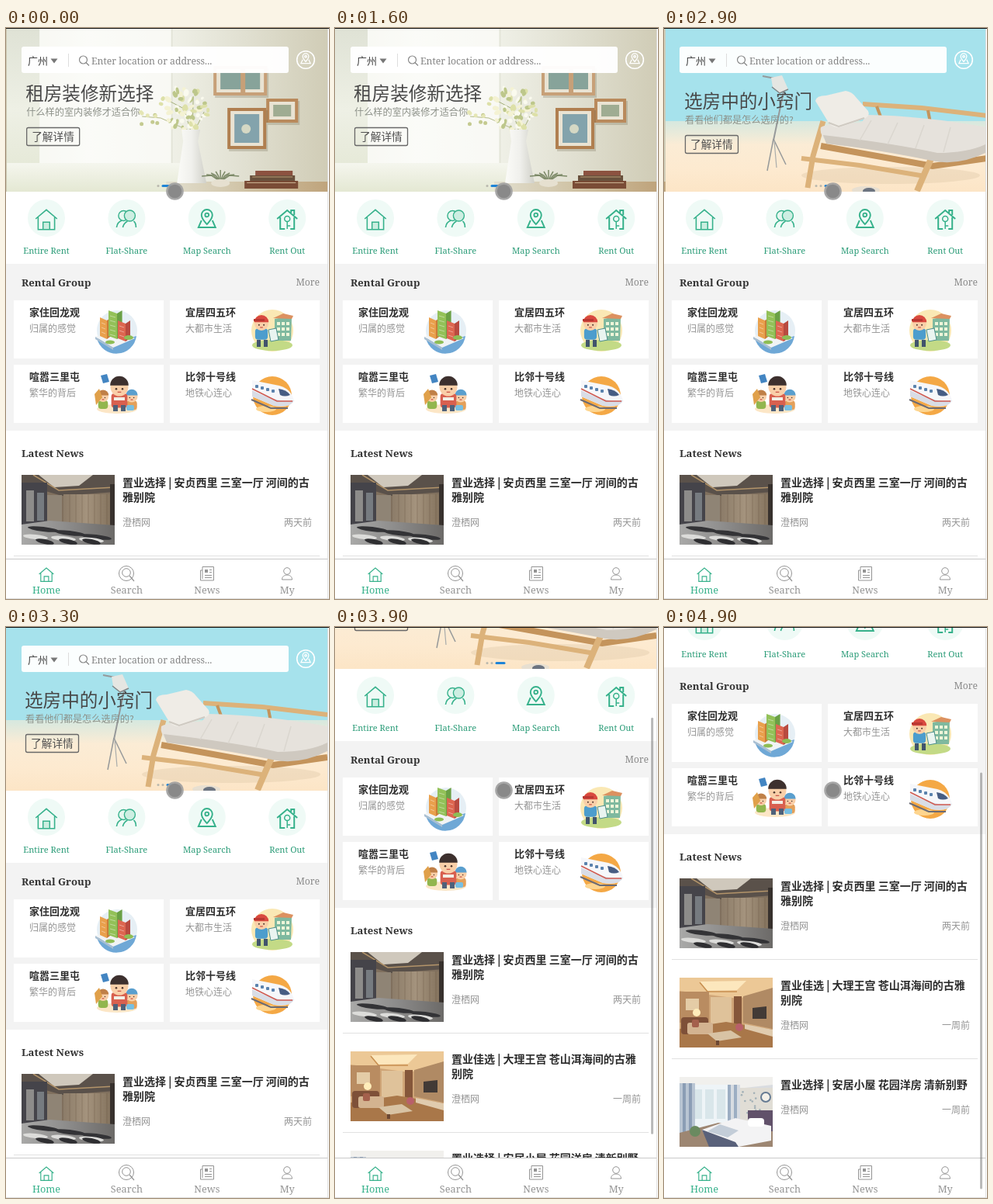
An HTML page with a canvas for the animation above (5000 ms loop, 416 by 736 pixels).

```html
<!DOCTYPE html>
<html lang="zh">
<head>
<meta charset="utf-8">
<style>
html, body { margin: 0; width: 100%; height: 100%; overflow: hidden; background: #fff; }
canvas { display: block; }
</style>
</head>
<body>
<canvas id="stage" width="416" height="736"></canvas>
<script>
const ctx = document.getElementById('stage').getContext('2d');
const SERIF = '"Noto Serif", serif';
const CJK = '"Noto Sans CJK SC", "Noto Sans CJK", sans-serif';
const LOOP = 5000, WIDTH = 414;
const GREEN = '#36b18b', GRAY = '#949494';

// drawing helpers
function paint(fill, stroke, w = 1) {
  if (fill) { ctx.fillStyle = fill; ctx.fill(); }
  if (stroke) { ctx.strokeStyle = stroke; ctx.lineWidth = w; ctx.stroke(); }
}
function rect(x, y, w, h, fill) { ctx.fillStyle = fill; ctx.fillRect(x, y, w, h); }
function round(x, y, w, h, r, fill, stroke, lw) {
  ctx.beginPath(); ctx.roundRect(x, y, w, h, r); paint(fill, stroke, lw);
}
function circle(x, y, r, fill, stroke, lw) {
  ctx.beginPath(); ctx.arc(x, y, r, 0, 7); paint(fill, stroke, lw);
}
function oval(x, y, rx, ry, fill, turn = 0) {
  ctx.beginPath(); ctx.ellipse(x, y, rx, ry, turn, 0, 7); paint(fill);
}
function trace(p) {
  ctx.beginPath();
  for (let i = 0; i < p.length; i += 2) ctx.lineTo(p[i], p[i + 1]);
}
function poly(p, fill) { trace(p); paint(fill); }
function line(p, color, w = 1) { trace(p); paint(null, color, w); }
function shape(d, fill, stroke, w = 1) {
  const p = new Path2D(d);
  if (fill) { ctx.fillStyle = fill; ctx.fill(p); }
  if (stroke) { ctx.strokeStyle = stroke; ctx.lineWidth = w; ctx.stroke(p); }
}
function text(s, x, y, size, color, { font = CJK, bold = false, align = 'left' } = {}) {
  ctx.font = `${bold ? 'bold ' : ''}${size}px ${font}`;
  ctx.textAlign = align; ctx.fillStyle = color;
  ctx.fillText(s, x, y);
}
function gradient(x0, y0, x1, y1, ...colors) {
  const g = ctx.createLinearGradient(x0, y0, x1, y1);
  colors.forEach((c, i) => g.addColorStop(i / (colors.length - 1), c));
  return g;
}
function at(x, y, draw) { ctx.save(); ctx.translate(x, y); draw(); ctx.restore(); }
function clipped(x, y, w, h, draw) {
  ctx.save(); ctx.beginPath(); ctx.rect(x, y, w, h); ctx.clip(); draw(); ctx.restore();
}
function random(seed) {
  return () => (seed = seed * 16807 % 2147483647) / 2147483647;
}

// timing: the carousel glides with a quartic ease-out, each wheel notch is a short smooth step
const SLIDE_MS = 858, NOTCH_MS = 200;
const progress = (t, start, span) => Math.min(1, Math.max(0, (t - start) / span));
const glide = (t, start) => 1 - (1 - progress(t, start, SLIDE_MS)) ** 4;
function notch(t, start) {
  const p = progress(t, start, NOTCH_MS);
  return p * p * (3 - 2 * p);
}
const scrollAt = t => 100 * notch(t, 3326) + 100 * notch(t, 3790) + 52 * notch(t, 4400);
const slideAt = t => WIDTH * (glide(t, -660) - 1 + glide(t, 2267));

// carousel
function caption(title, sub, y) {
  text(title, 24, y + 9, 23.6, '#484848');
  text(sub, 25, y + 29, 12.2, '#8d9189');
  round(25.5, y + 44.5, 68, 23, 2, null, '#686868', 1.3);
  text('了解详情', 32, y + 61, 13.7, '#505050');
}
function frame(x, y, w, h, wood, art) {
  rect(x + 2, y + 3, w, h, 'rgba(80,70,40,.2)');
  rect(x, y, w, h, wood);
  rect(x + 4, y + 4, w - 8, h - 8, '#e9e3d3');
  rect(x + 9, y + 8, w - 18, h - 16, art);
}
function roomSlide() {
  rect(0, 0, WIDTH, 211, gradient(0, 0, WIDTH, 0, '#eaece0', '#f5f6f0', '#f0f1e8', '#e0dfd0', '#d0ccb6'));
  rect(0, 0, 42, 211, gradient(0, 0, 0, 211, '#dfe2d5', '#eef0e5', '#e2e6d2'));
  rect(42, 0, 170, 174, 'rgba(255,255,253,.6)');
  line([212.5, 0, 212.5, 174], '#e3e4d8', 2);
  rect(0, 174, 225, 37, gradient(0, 174, 0, 211, '#f5f6ee', '#e4e8d3'));
  rect(205, 198, 209, 13, gradient(205, 0, WIDTH, 0, '#e2dfcf', '#cfc2a4', '#bfa47c'));
  frame(266, 49, 69, 38, '#c7a078', '#87a39a');
  rect(301, 49, 6, 38, '#c7a078');
  frame(334, 91, 41, 31, '#b98a5c', '#9fac92');
  frame(284, 103, 50, 53, '#b07f50', '#83a3ac');
  circle(308, 130, 6, '#d5d8c4');
  const rnd = random(41);
  line([237, 134, 228, 104, 205, 92], '#a5b07c');
  line([239, 134, 240, 88], '#a5b07c');
  line([241, 134, 254, 108], '#a5b07c');
  line([234, 132, 198, 116, 174, 114], '#b4bb8a');
  for (let i = 0; i < 62; i++) {
    const a = rnd() * 6.28, r = Math.sqrt(rnd());
    oval(226 + 34 * r * Math.cos(a), 105 + 27 * r * Math.sin(a), 2 + 3 * rnd(), 1.5 + 2 * rnd(),
      ['#f4f2d3', '#dde0a8', '#bdc78b', '#fafaee'][i % 4], a);
  }
  for (let i = 0; i < 8; i++) circle(172 + 22 * rnd(), 108 + 16 * rnd(), 2.5, i % 2 ? '#e5e6b4' : '#c4ca90');
  poly([225, 131, 249, 131, 246, 146, 257, 200, 219, 200, 227, 146], gradient(219, 0, 257, 0, '#fbfbf8', '#f0f0ec', '#d0d0c8'));
  for (let i = -4; i <= 4; i++) line([275, 198, 275 + i * 3, 190, 275 + i * 6, 183 + Math.abs(i) * 2], '#7d8a68', 1.5);
  oval(275, 200, 12, 5, '#e6e0d0');
  rect(320, 184, 48, 6, '#8c5240');
  rect(313, 190, 58, 7, '#68503c');
  rect(306, 197, 69, 10, '#7a4c36');
  line([309, 199.5, 372, 199.5], '#cbb291');
  line([316, 192, 368, 192], '#b99872');
  caption('租房装修新选择', '什么样的室内装修才适合你', 84);
}
function sofaSlide() {
  rect(0, 0, WIDTH, 211, '#a6e2ec');
  rect(0, 120, WIDTH, 91, gradient(0, 120, 0, 211, '#d6e8df', '#fbecd5', '#fdead0', '#fce5c6'));
  oval(290, 190, 115, 11, 'rgba(213,190,155,.3)');
  // lamp
  line([125, 62, 146, 66, 152, 82, 139, 145], '#96999a', 2);
  line([139, 143, 131, 184], '#96999a', 1.5);
  line([139, 143, 155, 176], '#96999a', 1.5);
  line([140, 145, 143, 180], '#a9acab', 1.2);
  poly([136, 64, 150, 61, 158, 79, 147, 84, 138, 76], '#e5e6e2');
  line([137, 76, 147, 84, 158, 79], '#808485', 1.5);
  // sofa
  const wood = '#dcb27a', dark = '#c4945c';
  line([254, 98, 330, 103, 414, 113], wood, 6);
  line([272, 101, 278, 117], dark, 4);
  line([338, 106, 342, 127], dark, 4);
  line([203, 120, 190, 165, 183, 206], wood, 7);
  line([200, 152, 344, 178, 414, 168], dark, 8);
  line([175, 168, 250, 177, 334, 191], wood, 6);
  line([346, 160, 336, 182, 324, 210], wood, 8);
  shape('M200 128Q210 122 252 122L260 112Q330 113 414 128V158Q380 172 350 168Q270 152 207 146Q198 137 200 128Z', '#e6e2dc');
  shape('M203 138Q290 148 350 161Q390 161 414 149V160Q380 177 348 172Q270 156 207 149Z', '#cfc9c0');
  shape('M193 94Q194 87 207 87L232 81Q240 82 245 89L261 107Q264 113 256 117L224 128Q215 129 210 122Z', '#efece6');
  line([210, 122, 223, 127, 256, 116], '#cfcac2', 2);
  for (let i = 0; i < 4; i++) line([265 + i * 34, 119 + i * 3, 250 + i * 36, 145 + i * 5], '#dad6cf', 1.5);
  oval(258, 209, 18, 5, '#e7dfd1');
  oval(262, 210, 8, 4, '#6c7480');
  caption('选房中的小窍门', '看看他们都是怎么选房的?', 94);
}
function carousel(slide) {
  clipped(0, 0, WIDTH, 211, () => {
    rect(0, 0, WIDTH, 211, '#cbc6ae');
    if (slide < WIDTH) at(-slide, 0, roomSlide);
    if (slide > 0) at(WIDTH - slide, 0, sofaSlide);
  });
  const active = slide > 0 ? 2 : 1;
  let x = 194.5;
  for (let i = 0; i < 3; i++) {
    const w = i === active ? 13 : 3;
    round(x, 202, w, 3, 1.5, i === active ? '#1f84d6' : '#b9b8ae');
    x += w + 3;
  }
}
function searchBar() {
  round(20, 24, 344, 34, 3, 'rgba(255,255,255,.96)');
  text('广州', 28, 47, 13, '#3c3c3c');
  poly([57.5, 39.5, 66.5, 39.5, 62, 45.5], '#777');
  line([80.5, 33, 80.5, 50], '#ddd');
  circle(99.5, 41, 5, null, '#888', 1.2);
  line([103, 44.5, 107, 48.5], '#888', 1.3);
  text('Enter location or address...', 110, 47, 12.2, '#858585', { font: SERIF });
  circle(386, 41, 11.3, null, '#fff', 1.6);
  pin(386, 39, .55, '#fff', 2.4);
}

// icons
function pin(x, y, k, color, w) {
  at(x, y, () => {
    ctx.scale(k, k);
    shape('M0 8C-4 3-7 1-7-4A7 7 0 0 1 7-4C7 1 4 3 0 8Z', null, color, w);
    circle(0, -4, 2.4, null, color, w);
    shape('M-7 3L-11 12H11L7 3', null, color, w);
  });
}
function homeIcon(x, y, k, color, w) {
  at(x, y, () => {
    ctx.scale(k, k);
    shape('M-13 0L0-11L13 0M-10-2V13H10V-2M-4 13V4H4V13', null, color, w);
  });
}
const menuIcons = [
  () => { homeIcon(0, 0, 1.06, GREEN, 1.5); rect(-3, 5, 6, 8, '#cbeee0'); },
  () => {
    shape('M-13 11Q-12 4-6 2M9 3Q12 5 12 11', null, GREEN, 1.6);
    circle(-4, -4, 6.5, '#e5f7f0', GREEN, 1.4);
    circle(4, -4, 7, '#cdeee2', GREEN, 1.4);
    shape('M1 3Q-4 6-5 11', null, GREEN, 1.6);
  },
  () => pin(0, -1, 1, GREEN, 1.9),
  () => {
    shape('M-13 0L0-11L13 0M-9-2V13H-3M9-2V13H4M5-8V-11H9V-5', null, GREEN, 2);
    circle(0, 0, 3.5, null, GREEN, 1.5);
    line([0, 3, 0, 13], GREEN, 1.5);
    line([0, 9, 4, 9], GREEN, 1.5);
  }
];
function menu() {
  ['Entire Rent', 'Flat-Share', 'Map Search', 'Rent Out'].forEach((label, i) => {
    const x = 52 + 103.4 * i;
    circle(x, 245, 24, '#effaf6');
    at(x, 246, menuIcons[i]);
    text(label, x, 291, 11, '#2b9c78', { font: SERIF, align: 'center' });
  });
}

// card pictures, centred on the origin
function kid(x, y, r, hair, shirt) {
  round(x - r * .9, y + r * .7, r * 1.8, r * 1.6, 4, shirt);
  circle(x, y, r, '#f9cfa8');
  ctx.beginPath(); ctx.arc(x, y - r * .2, r * 1.03, Math.PI, 0); paint(hair);
  circle(x - r * .35, y + r * .2, r * .11, '#4a342c');
  circle(x + r * .35, y + r * .2, r * .11, '#4a342c');
  line([x - r * .2, y + r * .55, x + r * .2, y + r * .55], '#c84f43', 1.2);
}
function tower(x, top, w, bottom, front, side) {
  poly([x, top, x + w, top + 4, x + w, bottom + 4, x, bottom], front);
  poly([x + w, top + 4, x + w * 1.6, top, x + w * 1.6, bottom, x + w, bottom + 4], side);
  for (let y = top + 7; y < bottom; y += 6) line([x + 2, y, x + w - 2, y + 2], 'rgba(255,255,255,.4)');
}
const pictures = [
  () => {
    circle(1, 1, 26, '#e6eff5');
    shape('M-25 11A26 26 0 0 0 26 8L-2 17Z', '#6fa8d6');
    poly([-27, 9, 0, 0, 24, 11, -4, 23], '#f1f3f4');
    poly([-27, 9, -4, 23, -4, 26, -27, 12], '#a9bfd2');
    tower(-21, -16, 9, 8, '#e9a04c', '#c97c38');
    tower(-10, -25, 11, 8, '#93c158', '#6aa045');
    tower(2, -12, 10, 11, '#dd6650', '#b84a40');
    oval(16, 10, 6, 3, '#8dbd55');
    oval(-8, 16, 6, 2.5, '#8dbd55');
  },
  () => {
    circle(0, 1, 27, '#fae8b4');
    oval(0, 20, 26, 7, '#c3da86');
    poly([3, -14, 25, -18, 24, 14, 3, 14], '#7fb99f');
    poly([1, -15, 14, -21, 27, -18, 25, -14], '#dc9160');
    for (let i = 0; i < 9; i++) rect(6 + i % 3 * 6, -10 + (i / 3 | 0) * 7, 4, 4, '#eef5d9');
    kid(-14, -8, 9, '#d9493f', '#4c9dcd');
    rect(-24, -14, 14, 3, '#b93831');
    poly([-5, 0, 5, -2, 8, 13, -2, 15], '#e9f4f0');
    line([-5, 0, 5, -2, 8, 13, -2, 15, -5, 0], '#4d8f8a');
    rect(-20, 13, 5, 9, '#41546c');
    rect(-11, 13, 5, 9, '#41546c');
  },
  () => {
    oval(1, 19, 26, 6, '#fce6c6');
    poly([-20, -24, -12, -26, -9, -16, -17, -14], '#4385c2');
    kid(-17, 3, 7, '#c08048', '#92b64e');
    poly([-28, 0, -22, -7, -18, 4, -26, 14], '#e0a04a');
    kid(20, 3, 7.5, '#5a9fce', '#e4a05a');
    kid(4, -9, 11.5, '#3d302e', '#d8604f');
    rect(-3, 4, 14, 4, '#f3efe5');
    round(13, 14, 10, 7, 2, '#77bfe2');
    rect(-4, 14, 6, 8, '#4e617a');
    rect(6, 14, 6, 8, '#4e617a');
  },
  () => {
    circle(0, 2, 25, '#f4a845');
    oval(-8, 19, 13, 4, '#fdd58f');
    ctx.scale(-1, 1);
    shape('M-28 8Q-24-7-9-11L26-18V3L-2 15Q-24 18-28 8Z', '#f6f7fa');
    shape('M-28 8Q-8 12 26-5V3L-2 15Q-24 18-28 8Z', '#d9dde6');
    shape('M-23 1Q-18-6-8-7L-10 1Q-16 4-23 1Z', '#475d83');
    line([-26, 9, -6, 9, 26, -7], '#cf5a50', 1.5);
    for (let i = 0; i < 4; i++) round(-3 + i * 7, -6 - i * 2, 4, 4, 1, '#5a82ad');
    line([-20, 18, 2, 18, 27, 7], '#6b6b75', 2);
  }
];
function rentalGroup() {
  rect(0, 304, WIDTH, 215, '#f3f3f3');
  text('Rental Group', 20, 333, 13.2, '#333', { font: SERIF, bold: true });
  text('More', 404, 332, 12.1, '#8a8a8a', { font: SERIF, align: 'right' });
  [['家住回龙观', '归属的感觉'], ['宜居四五环', '大都市生活'], ['喧嚣三里屯', '繁华的背后'], ['比邻十号线', '地铁心连心']]
    .forEach(([title, sub], i) => {
      const x = 10 + 201 * (i % 2), y = 351 + 83 * (i >> 1);
      rect(x, y, 193, 75, '#fff');
      text(title, x + 20, y + 20, 13, '#2e2e2e', { bold: true });
      text(sub, x + 20, y + 41, 12, GRAY);
      at(x + 132, y + 38, pictures[i]);
    });
}

// news photos, 120 by 90
const photos = [
  () => {
    rect(0, 0, 120, 90, '#80705e');
    poly([0, 0, 120, 0, 120, 22, 52, 27, 0, 12], '#5a514a');
    poly([22, 0, 92, 0, 74, 14, 42, 16], '#cfc8bc');
    line([15, 0, 48, 20, 120, 16], '#b3946a', 1.5);
    rect(0, 10, 33, 54, '#45444a');
    rect(6, 20, 10, 40, '#8d8c8a');
    rect(20, 23, 9, 36, '#767b80');
    rect(33, 26, 19, 34, '#8f8475');
    rect(54, 25, 60, 40, gradient(54, 0, 114, 0, '#8c7c69', '#a4937d', '#85745f'));
    for (let x = 62; x < 114; x += 8) line([x, 25, x, 64], 'rgba(80,62,46,.25)');
    rect(114, 12, 6, 60, '#37312d');
    poly([0, 64, 36, 59, 120, 65, 120, 90, 0, 90], gradient(0, 0, 120, 0, '#a9a9a8', '#8c8b8a', '#6c6a68'));
    for (let i = 0; i < 3; i++) {
      oval(28 + i * 34, 70 + i * 5, 20, 3, '#333336', .12);
      oval(18 + i * 36, 80 + i * 2, 16, 3, '#dcdcda', .1);
      oval(30 + i * 30, 86, 12, 3, '#2e2e31', .2);
    }
  },
  () => {
    rect(0, 0, 120, 90, '#cfa577');
    poly([0, 0, 120, 0, 120, 15, 76, 27, 0, 17], '#ecc896');
    poly([26, 5, 86, 4, 74, 16, 36, 17], '#fce7bd');
    line([26, 6, 36, 18, 74, 18], '#c88f50', 1.5);
    rect(0, 18, 38, 40, '#b98c61');
    rect(8, 27, 17, 15, '#e4cca6');
    rect(40, 25, 27, 36, '#dfc29a');
    rect(70, 24, 10, 38, '#85573a');
    poly([82, 24, 120, 13, 120, 66, 82, 58], '#b08a64');
    poly([94, 39, 112, 37, 112, 53, 94, 53], '#423a36');
    poly([0, 66, 60, 57, 120, 67, 120, 90, 0, 90], '#a97749');
    circle(22, 45, 5, '#ffedba');
    round(2, 51, 35, 22, 4, '#7e5038');
    round(10, 58, 33, 15, 3, '#d3b390');
    round(16, 54, 9, 10, 2, '#a4604c');
    poly([36, 72, 66, 68, 80, 77, 48, 82], '#d8c3a4');
    rect(47, 81, 4, 6, '#6b4733');
    oval(77, 64, 5, 5, '#b8606a');
    poly([84, 60, 120, 67, 120, 76, 84, 66], '#e0cbae');
  },
  () => {
    rect(0, 0, 120, 90, '#d9dce0');
    poly([0, 0, 120, 0, 120, 10, 75, 15, 0, 8], '#f1f0ed');
    rect(0, 10, 74, 55, '#eef4f7');
    for (let x = 18; x < 64; x += 15) rect(x, 16, 11, 38, '#d9e6ea');
    for (let i = 0; i < 5; i++) rect(i * 4, 8, 4, 68, i % 2 ? '#8b9db5' : '#b9c5d3');
    for (let i = 0; i < 4; i++) rect(62 + i * 4, 10, 4, 54, i % 2 ? '#d7dce2' : '#9caec3');
    rect(78, 14, 42, 48, '#e0ddd5');
    const rnd = random(9);
    for (let i = 0; i < 18; i++) circle(80 + 38 * rnd(), 17 + 34 * rnd(), 1.3, '#a2b0b6');
    circle(111, 26, 6, '#f4f1e9', '#667b93', 2);
    poly([0, 72, 50, 59, 120, 70, 120, 90, 0, 90], '#9d8672');
    rect(88, 43, 32, 27, '#61516a');
    poly([29, 68, 72, 53, 118, 63, 118, 82, 76, 90, 38, 85], '#f3f3f4');
    poly([29, 68, 72, 84, 76, 90, 38, 90], '#59617a');
    poly([52, 61, 76, 69, 62, 78, 36, 70], '#c3cdd8');
    round(88, 53, 21, 11, 4, '#fff');
    circle(20, 70, 7, '#6a8a60');
  }
];
const articles = [
  ['置业选择 | 安贞西里 三室一厅 河间的古', '雅别院', '两天前'],
  ['置业佳选 | 大理王宫 苍山洱海间的古雅', '别院', '一周前'],
  ['置业选择 | 安居小屋 花园洋房 清新别野', '', '一周前']
];
function news() {
  text('Latest News', 20, 553, 13.2, '#333', { font: SERIF, bold: true });
  articles.forEach(([first, second, age], i) => {
    const y = 576 + 128 * i, foot = y + (second ? 66 : 47);
    clipped(20, y, 120, 90, () => at(20, y, photos[i]));
    text(first, 150, y + 15, 14, '#2c2c2c', { bold: true });
    text(second, 150, y + 34, 14, '#2c2c2c', { bold: true });
    text('澄栖网', 150, foot, 12, GRAY);
    text(age, 394, foot, 12, GRAY, { align: 'right' });
    rect(10, y + 104, 394, 1, '#e1e1e1');
  });
}

function tabBar() {
  rect(0, 684, WIDTH, 52, '#fff');
  rect(0, 684, WIDTH, 1, '#c9c9c9');
  homeIcon(52, 704, .72, GREEN, 1.6);
  circle(155, 703, 9.5, null, GRAY);
  circle(155, 702, 5.3, null, GRAY);
  line([159, 706, 165, 713], GRAY, 1.2);
  shape('M253 694.5H267.5V712H250.5V699H253ZM253 699V710', null, GRAY);
  rect(256, 698, 4, 4, GRAY);
  for (const y of [698.5, 701.5, 705.5, 708.5]) line([y < 703 ? 262 : 256, y, 265, y], GRAY);
  circle(362, 700, 4.3, null, GRAY);
  shape('M355.5 711C355.5 703 368.5 703 368.5 711Z', null, GRAY);
  ['Home', 'Search', 'News', 'My'].forEach((label, i) =>
    text(label, 52 + 103.4 * i, 729, 12.7, i ? GRAY : GREEN, { font: SERIF, align: 'center' }));
}

function draw(t) {
  const scroll = Math.round(scrollAt(t));
  rect(0, 0, 416, 736, '#fff');
  clipped(0, 1, WIDTH, 683, () => at(0, -scroll, () => {
    carousel(slideAt(t));
    searchBar();
    menu();
    rentalGroup();
    news();
  }));
  tabBar();
  if (scroll) round(407, Math.max(1, scroll * .744), 3, 537, 1.5, 'rgba(130,130,130,.55)');
  rect(414, 1, 1, 735, '#e0e0e0');
  rect(0, 735, 416, 1, '#dedede');
  rect(0, 0, 416, 1, '#111');
  circle(217.5, 210.5, 11.3, 'rgba(160,160,160,.92)');
  circle(217.5, 210.5, 8.8, '#898989');
}
function tick(now) {
  draw(Math.floor(now % LOOP / 100) * 100);
  requestAnimationFrame(tick);
}
requestAnimationFrame(tick);
</script>
</body>
</html>
```
